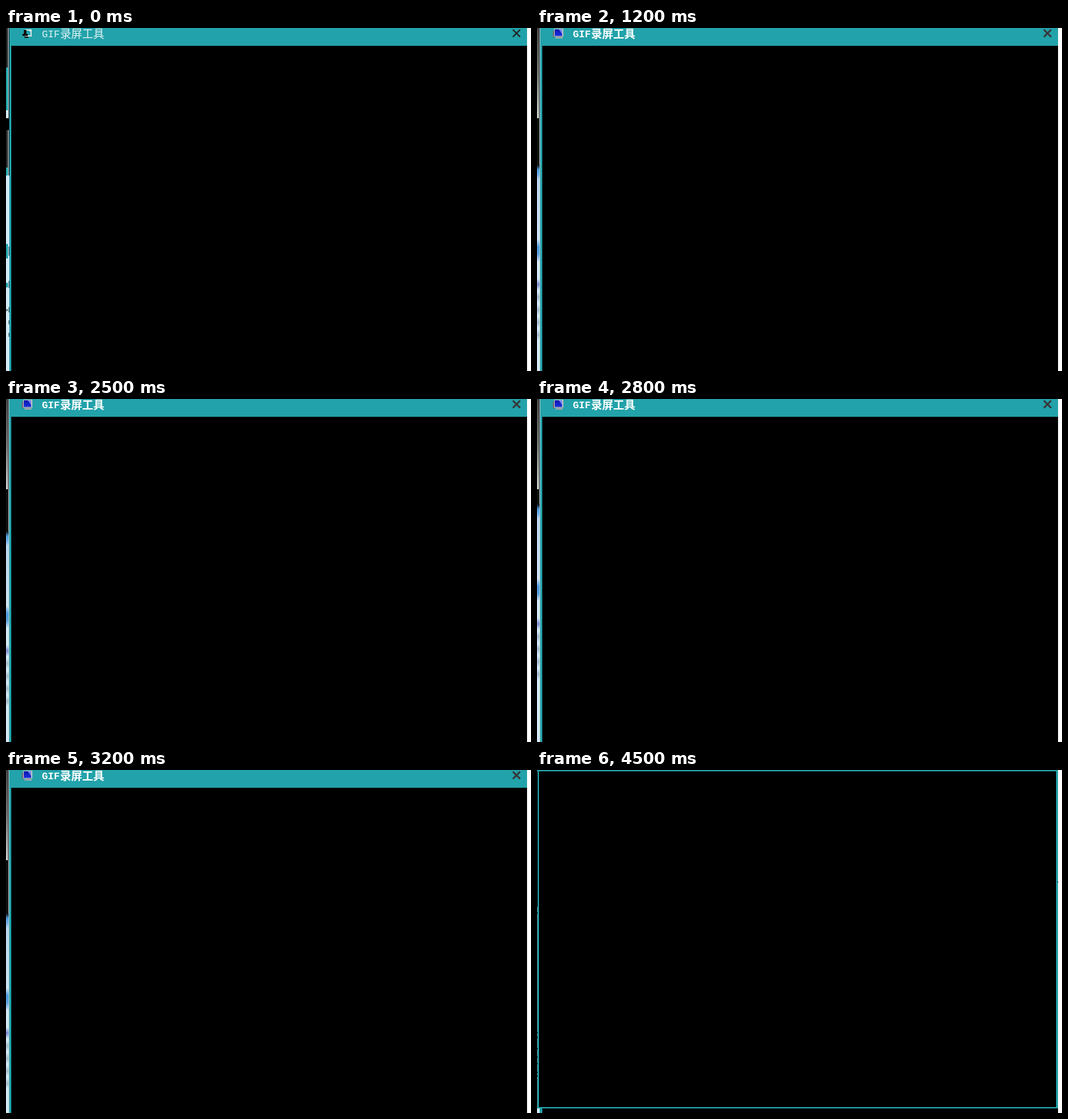
An HTML page with a canvas that plays this animation: 796 by 521 pixels, repeating every 4.6 s.

```html
<!DOCTYPE html>
<html lang="zh">
<head>
<meta charset="utf-8">
<style>
  html, body { margin: 0; width: 100%; height: 100%; overflow: hidden; background: #fff; }
  canvas { display: block; }
</style>
</head>
<body>
<canvas id="stage" width="796" height="521"></canvas>
<script>
const ctx = document.getElementById('stage').getContext('2d');
const TEAL = '#22a2aa', PALE = '#d5e9f7', LOOP = 4600;

// Page scroll offset: [start time, pixels]
const scrollSteps = [
  [0, 0], [2200, -3], [2300, -7], [2700, -24], [2800, -48], [2900, -68],
  [3000, -76], [3100, -42], [3200, 10], [3300, 27], [3400, 39], [3500, 30], [3600, 21]
];

function rect(color, x, y, w, h) {
  ctx.fillStyle = color;
  ctx.fillRect(x, y, w, h);
}

function gradient(y0, y1, ...colors) {
  const g = ctx.createLinearGradient(0, y0, 0, y1);
  colors.forEach((c, i) => g.addColorStop(i / (colors.length - 1), c));
  return g;
}

function band(y, h, ...colors) {
  rect(gradient(y, y + h, ...colors), 0, y, 4, h);
}

function coarseStrip() {
  rect(PALE, 0, 0, 5, 521);
  rect('#242424', 0, 0, 3, 60);
  rect(TEAL, 0, 60, 3, 65);
  rect('#000', 0, 137, 4, 18);
  rect('#2b2b2b', 0, 155, 3, 57);
  rect('#000', 4, 0, 1, 224);
  rect(TEAL, 0, 212, 3, 12);
  rect(TEAL, 0, 328, 3, 22);
  rect(TEAL, 0, 387, 3, 7);
  rect('#667f86', 0, 427, 3, 3);
  for (const [y, h] of [[332, 14], [384, 11], [424, 8], [444, 6], [463, 6]]) {
    rect('#294a50', 4, y, 1, h);
  }
}

function smoothStrip(offset) {
  ctx.save();
  ctx.beginPath();
  ctx.rect(0, 136, 5, 385);
  ctx.clip();
  rect(PALE, 0, 136, 5, 385);
  ctx.translate(0, offset);
  rect('#101010', 0, 80, 4, 131);
  rect('#555', 3, 80, 1, 131);
  band(208, 22, '#101010', '#4f9fe0', '#72b1e8', '#b9d6f0');
  band(230, 93, '#b9d6f0', '#d0e4f5');
  band(322, 32, '#c8dff4', '#4d9ce0', '#5b9fdf', '#c8dff4');
  band(381, 17, PALE, '#7d8bd4', PALE);
  for (const y of [409, 428, 447, 466]) band(y - 8, 16, PALE, '#a6bccb', PALE);
  ctx.restore();
  rect(gradient(0, 137, '#484848', '#777', '#d0d0d0'), 0, 0, 3, 137);
  rect('#333', 3, 0, 1, 137);
  rect('#a9c9cc', 4, 0, 1, 521);
}

function icon(coarse) {
  if (coarse) {
    rect('#c9dfe0', 29, 2, 10, 11);
    rect(TEAL, 31, 4, 6, 7);
    rect('#111', 27, 3, 4, 6);
    rect('#111', 25, 9, 8, 3);
    rect('#111', 28, 13, 6, 2);
    rect('#e6f2f2', 35, 3, 3, 2);
    return;
  }
  rect('#676d78', 24, 4, 3, 10);
  rect('#b9bdc5', 26, 1, 14, 12);
  rect(gradient(2, 12, '#0c16a8', '#1b2fe0'), 27, 2, 11, 10);
  ctx.fillStyle = '#6d86ee';
  ctx.beginPath();
  ctx.moveTo(33, 2);
  ctx.lineTo(38, 2);
  ctx.lineTo(38, 9);
  ctx.fill();
  rect('#777d88', 30, 13, 7, 1);
  rect('#a9adb5', 28, 14, 11, 2);
}

function titleBar(coarse) {
  rect(TEAL, 5, 0, 785, 27);
  icon(coarse);
  ctx.fillStyle = coarse ? '#e2f3f4' : '#fff';
  ctx.textBaseline = 'alphabetic';
  const weight = coarse ? 'normal' : 'bold';
  ctx.font = `${weight} 15px "Liberation Mono", monospace`;
  ctx.fillText('GIF', 54.5, 14);
  ctx.font = `${weight} 16.8px "Noto Sans CJK SC", "Noto Sans CJK", sans-serif`;
  ctx.fillText('录屏工具', 82, 14.5);

  ctx.strokeStyle = coarse ? '#222' : '#373737';
  ctx.lineWidth = coarse ? 2 : 2.6;
  ctx.beginPath();
  ctx.moveTo(768.5, 2.5);
  ctx.lineTo(779.5, 13.5);
  ctx.moveTo(779.5, 2.5);
  ctx.lineTo(768.5, 13.5);
  ctx.stroke();
}

function selectionFrame() {
  rect('#000', 0, 0, 790, 521);
  rect(TEAL, 0, 0, 790, 2);
  rect(TEAL, 1, 0, 2, 514);
  rect(TEAL, 787, 0, 3, 514);
  rect(TEAL, 0, 512, 790, 2);
  rect('#52777c', 0, 208, 1, 304);
  for (const y of [216, 398, 405, 422, 435, 445, 458, 464]) rect('#000', 0, y, 1, 2);
  rect('#000', 789, 169, 1, 2);
  rect(PALE, 0, 514, 4, 7);
  rect(TEAL, 4, 514, 4, 7);
}

function draw(t) {
  rect('#fff', 0, 0, 796, 521);
  if (t >= 4500) return selectionFrame();
  const coarse = t < 100;
  if (coarse) coarseStrip();
  else smoothStrip(scrollSteps.findLast(([start]) => t >= start)[1]);
  titleBar(coarse);
  rect(TEAL, 5, 27, 3, 494);
  rect('#000', 8, 27, 782, 494);
}

const startTime = performance.now();
function tick() {
  draw((performance.now() - startTime) % LOOP);
  requestAnimationFrame(tick);
}
tick();
</script>
</body>
</html>
```
